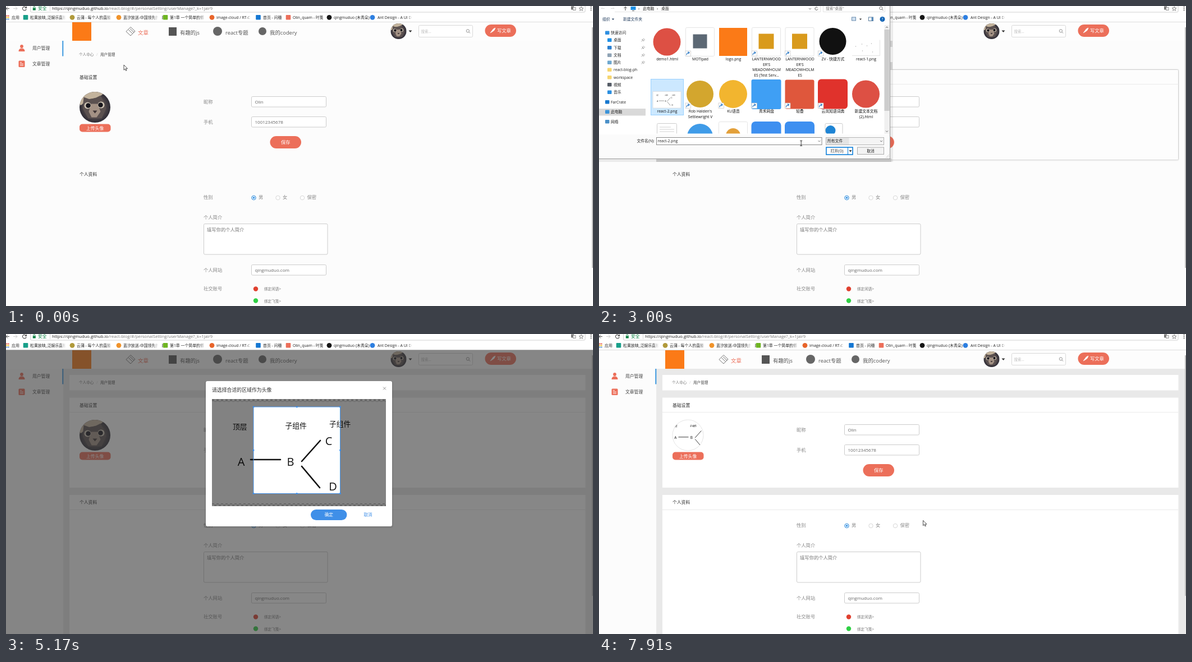
These frames come from a looping animation (1046x535 px, 8000 ms). An HTML page:

```html
<!DOCTYPE html>
<html lang="zh-CN">
<head>
<meta charset="utf-8">
<title>用户管理</title>
<style>
html, body { margin: 0; width: 100%; height: 100%; overflow: hidden; background: #fff; }
svg { display: block; width: 1046px; height: 535px; }
text { font-family: "Open Sans", "Noto Sans CJK SC", "Noto Sans CJK", sans-serif; white-space: pre; }
</style>
</head>
<body>
<svg id="stage" viewBox="0 0 1046 535" xmlns="http://www.w3.org/2000/svg"></svg>
<script>
const RED = '#ec6f5a', BLUE = '#3f8fe8', LOOP = 8000;

// Drawing helpers: each returns SVG markup
const text = (x, y, size, str, fill = '#444', more = '') =>
  `<text x="${x}" y="${y + size * 0.36}" font-size="${size}" fill="${fill}" ${more}>${str}</text>`;
const mid = (x, y, size, str, fill) => text(x, y, size, str, fill, 'text-anchor="middle"');
const rect = (x, y, w, h, fill, more = '') =>
  `<rect x="${x}" y="${y}" width="${w}" height="${h}" fill="${fill}" ${more}/>`;
const box = (x, y, w, h, stroke = '#ccc', fill = '#fff', r = 2) =>
  rect(x + .5, y + .5, w - 1, h - 1, fill, `stroke="${stroke}" rx="${r}"`);
const dot = (x, y, r, fill, more = '') => `<circle cx="${x}" cy="${y}" r="${r}" fill="${fill}" ${more}/>`;
const path = (d, stroke, w = 1, fill = 'none') =>
  `<path d="${d}" stroke="${stroke}" stroke-width="${w}" fill="${fill}"/>`;
const group = (id, body, more = '') => `<g id="${id}" ${more}>${body}</g>`;
const lens = (x, y, c) => dot(x - .6, y - .6, 2.6, 'none', `stroke="${c}" stroke-width=".8"`) +
  path(`M${x + 1.3} ${y + 1.3}l2.2 2.2`, c, .9);
const chevron = (x, y, c = '#555') => path(`M${x - 2} ${y - 1}l2 2l2-2`, c, .8);
const caret = (x, y, c = '#333', s = 2.2) => path(`M${x - s} ${y - s / 2}h${2 * s}l${-s} ${s * 1.2}z`, 'none', 0, c);

const defs = `<defs>
  <clipPath id="round"><circle r="27.5"/></clipPath>
  <clipPath id="files"><rect x="84" y="33" width="425" height="194.5"/></clipPath>
  <clipPath id="frame"><rect x="367" y="116" width="310" height="191"/></clipPath>
  <linearGradient id="fade"><stop offset="0" stop-color="#fff" stop-opacity="0"/><stop offset="1" stop-color="#fff"/></linearGradient>
  <radialGradient id="fur"><stop offset="0" stop-color="#8b7a70"/><stop offset=".55" stop-color="#5a504f"/><stop offset="1" stop-color="#2d2b35"/></radialGradient>
  <pattern id="check" x="367" y="116" width="8" height="8" patternUnits="userSpaceOnUse">
    ${rect(0, 0, 8, 8, '#fff') + rect(0, 0, 4, 4, '#ccc') + rect(4, 4, 4, 4, '#ccc')}</pattern>
  ${group('cat', rect(-28, -28, 56, 56, 'url(#fur)') +
    path('M-28-28H20L6-17L-14-14L-24-4H-28z', 'none', 0, '#c3b39c') +
    path('M-20-18L-9-14L2-17L10-21L15-11L20 2L12 20H-12L-22 2z', 'none', 0, '#5b5150') +
    path('M-7-6L5-6L10 8L3 18H-6L-11 8z', 'none', 0, '#a39184') +
    dot(-13, -3, 6, '#cfc4b4') + dot(-12, -3, 4.3, '#17151b') + dot(11, -4, 6, '#cfc4b4') + dot(10, -4, 4.3, '#17151b') +
    path('M-4 6H4L0 11z', 'none', 0, '#3c3233'), 'clip-path="url(#round)"')}
  ${group('diagram', text(404, 165, 12.8, '顶层', '#111') + text(497.5, 163, 12.8, '子组件', '#111') +
    text(576, 160, 12.8, '子组件', '#111') +
    [['A', 419, 228], ['B', 507, 228], ['C', 575, 191], ['D', 582.5, 272]].map(([s, x, y]) => mid(x, y, 20, s, '#111')).join('') +
    path('M436 224H489M527 227L560 190M527 236L559 274', '#111', 2.6), 'stroke-linecap="round"')}
</defs>`;

function browserBar() {
  const marks = [
    [35, '#19a08a', 43, '松果放映_泛娱乐直播', 106], [118, '#b09a3c', 126, '云蒲 - 每个人的直播平', 188, 1],
    [201, '#f0932b', 209, '蓝汐放送-中国领先的游', 271, 1], [284, '#6fb522', 292, '第1章 一个简单的博客', 354],
    [367, '#e8642a', 375, 'image-cloud / RT-C', 437, 1], [449.5, '#1577d2', 458, '首页 - 问穗', 0],
    [503, RED, 511, 'Olin_quam - 叶笺', 0], [576, '#161616', 584, 'qingmuduo (木青朵)', 0, 1],
    [653, '#2e7fe0', 662, 'Ant Design - A UI D', 724, 1]];
  let s = rect(0, 0, 1046, 28.5, '#fff') + rect(0, 28, 1046, 1, '#dcdcdc');
  s += path('M6 4.5H0M3 1.5L0 4.5L3 7.5', '#555') + path('M13 4.5H20M17 1.5L20 4.5L17 7.5', '#ccc');
  s += path('M35.6 2.5A3.4 3.4 0 1 0 36.2 5.5M36.4 .8V3.4H33.6', '#444', 1.1);
  s += path('M43.5 0V9Q43.5 11 45.5 11H1030Q1032 11 1032 9V0', '#d0d0d0');
  s += rect(47.8, 3.6, 5, 4, '#0b8043') + path('M48.8 4V2.4a1.5 1.5 0 0 1 3 0V4', '#0b8043', .9);
  s += text(57, 4.5, 7.8, '安全', '#0b8043') + rect(78, 0, .8, 9, '#ccc');
  s += text(82, 4.5, 7.6, 'https://qingmuduo.github.io<tspan fill="#777">/react-blog/#/personalSetting/userManage?_k=1jair9</tspan>', '#222');
  s += rect(1007, .5, 5, 6, '#777') + box(1010, 2, 5.5, 6, '#999', '#eee', 0);
  s += path('M1025 1l1.1 2.5l2.7.2l-2.1 1.8l.7 2.7l-2.4-1.5l-2.4 1.5l.7-2.7l-2.1-1.8l2.7-.2z', '#555', .7);
  s += [1.5, 4.5, 7.5].map(y => dot(1042.5, y, .9, '#555')).join('');
  for (let i = 0; i < 6; i++) s += rect(i % 2 * 3 + .5, 16.5 + (i >> 1) * 3, 2, 2, ['#e5483b', '#f4b400', '#4285d4'][i >> 1]);
  s += text(10, 20.5, 7, '应用', '#333');
  for (const [ix, c, x, label, end, circle] of marks) {
    s += circle ? dot(ix, 20.3, 4.4, c) : rect(ix - 4.3, 16, 8.6, 8.6, c, 'rx="1"');
    s += text(x, 20.5, 6.9, label, '#222');
    if (end) s += rect(end - 9, 15, 9, 12, 'url(#fade)') + rect(end, 15, 7, 12, '#fff');
  }
  return s;
}

function header() {
  return rect(0, 29, 1046, 33, '#fdfdfd') + rect(118, 29, 34, 33, '#fb7a17') +
    path('M222 37.5L230 45L222 53L214 45.500z M218.500 42.500L225.500 49.300M221 40.500L228 47', '#666', .9) +
    text(235, 48, 9.4, '文章', RED) + rect(290, 38, 14, 15, '#555') + text(310, 48, 9.4, '有趣的js', '#555') +
    dot(377, 45, 8, '#666') + text(391, 48, 9.4, 'react专题', '#555') +
    dot(457, 45, 7, '#666') + text(470, 48, 9.4, '我的codery', '#555') +
    '<use href="#cat" transform="translate(699.5 45) scale(.51)"/>' + caret(720.5, 45, '#333', 3) +
    box(735, 34, 97, 22, '#d9d9d9') + text(739.5, 45.5, 6.5, '搜索...', '#bbb') + lens(823.5, 45, '#777') +
    rect(853.5, 33, 55.5, 22, RED, 'rx="11"') + path('M863 48L866 44Q868 40 872 39Q871 44 866.500 46z', '#fff', .7, '#fff') +
    text(875, 44, 8.3, '写文章', '#fff');
}

function sidebar() {
  return dot(28, 72, 2.9, RED) + path('M22.500 81Q22.500 75.500 28 75.500T33.500 81z', 'none', 0, RED) + text(47, 75.5, 7.8, '用户管理') +
    rect(100.4, 62, 1.8, 27.5, '#2a8fdc') + rect(22.5, 97.5, 11, 11.5, RED, 'rx="1.5"') +
    path('M25 100.700h3M25 103.300h6M25 106h6', '#fff', 1) + text(47, 103, 7.8, '文章管理');
}

function content() {
  const label = (y, s) => text(352, y, 8.3, s, '#888');
  const field = (y, s) => box(437, y, 134, 19.5) + text(443.5, y + 9.8, 8, s, '#666');
  const radio = (x, s) => dot(x, 342, 3.7, '#fff', 'stroke="#ccc" stroke-width=".8"') + text(x + 8.5, 341, 8.3, s, '#888');
  return text(130, 87, 6.6, '个人中心', '#777') + text(161, 87, 6.6, '/', '#ccc') + text(168, 87, 6.6, '用户管理', '#444') +
    text(131, 127, 7.8, '基础设置', '#333') +
    '<use id="oldPic" href="#cat" transform="translate(158.5 180.5)"/>' +
    group('newPic', dot(0, 0, 27.5, '#fff', 'stroke="#ddd" stroke-width=".8"') +
      '<g clip-path="url(#round)"><use href="#diagram" transform="translate(-27.5 -27.5) scale(.3245) translate(-402.5 -129)"/></g>',
      'transform="translate(158.5 180.5)"') +
    rect(131, 210.5, 55.5, 14, RED, 'rx="5"') + text(143, 217.8, 7.8, '上传头像', '#fff') +
    label(171, '昵称') + field(161, 'Olin') + label(207, '手机') + field(197, '10012345678') +
    rect(470.5, 232, 55.5, 22, RED, 'rx="11"') + text(490, 243, 8.3, '保存', '#fff') +
    text(131, 300.5, 7.8, '个人资料', '#333') + label(341, '性别') +
    radio(441.5, '男') + dot(441.5, 342, 3.7, 'none', `stroke="#2a8fe6"`) + dot(441.5, 342, 1.8, '#2a8fe6') +
    radio(484.5, '女') + radio(528, '保密') +
    label(377, '个人简介') + box(352, 388, 221.5, 55.5) + text(358, 399.5, 8.3, '填写你的个人简介', '#777') +
    label(471, '个人网站') + field(461, 'qingmuduo.com') + label(504, '社交账号') +
    dot(445, 504.5, 4.2, '#e0402f') + text(460, 505, 6.6, '绑定闲语&gt;', '#777') +
    dot(445, 525.5, 4.2, '#2fd044') + text(460, 526.5, 6.6, '绑定飞笺&gt;', '#777');
}

function page() {
  const panel = (y, h) => rect(113, y, 919.5, h, '#fff');
  const rule = y => rect(113, y, 919.5, 1, '#ebebeb');
  return rect(0, 29, 1046, 506, '#fcfcfc') +
    group('gaps', rect(102, 62, 944, 473, '#e9e9e9') + panel(73, 27.5) + panel(113.5, 160.5) + panel(287, 248) + rule(139) + rule(313)) +
    group('hover', box(111, 112, 923, 164.5, '#eee', 'none', 3) + box(112, 113, 921, 162, '#d2d2d2', '#fdfdfd', 2) + rule(139) +
      rect(519, 62, 4, 11, '#ddd') + rect(519, 100, 4, 13, '#ddd')) +
    header() + sidebar() + content() + rect(1044, 38, 2, 429, '#bdbdbd');
}

function fileList() {
  const cols = [121, 180, 239, 298, 357.5, 416.5, 475.5];
  const sheet = (x, y) => box(x - 26, y - 26, 52, 52, '#e4e4e4');
  const sq = (x, y, s, c, r = 0) => rect(x - s / 2, y - s / 2, s, s, c, `rx="${r}"`);
  const link = (x, y) => rect(x - 26, y + 16, 9.5, 9.500, '#fff', 'stroke="#bbb" stroke-width=".6"') +
    path(`M${x - 24} ${y + 23.500}q0-4 5-4.500m-2.600-1.600l2.600 1.600l-1.800 2.500`, '#1c6fc0', 1.100);
  const rows = [
    [64, [[x => dot(x, 64, 24.5, '#dd5044'), 'demo1.html'],
      [x => sheet(x, 64) + sq(x, 63, 25, '#5c6874') + link(x, 64), 'MOTIpad'],
      [x => sq(x, 64, 50, '#fb7a17'), 'logo.png'],
      [x => sheet(x, 64) + sq(x, 63, 27, '#d99a1c') + link(x, 64), 'LANTERNWOOD', 'ER&#39;S', 'MEADOWHOLM', 'ES (Test Serv...'],
      [x => sheet(x, 64) + sq(x, 63, 27, '#d99a1c') + link(x, 64), 'LANTERNWOOD', 'ER&#39;S', 'MEADOWHOLM', 'ES'],
      [x => dot(x, 63, 24, '#111') + link(x, 64), 'ZV - 快捷方式'],
      [x => rect(x - 24.5, 61, 49, 27.500, '#fff') + path(`M${x - 24.500} 88.500h49.500v-28`, '#ddd', .8) +
        [[-18, 72], [-7, 68], [-6, 80], [2, 71], [10, 67], [12, 82]].map(p => dot(x + p[0], p[1], .7, '#aaa')).join(''), 'react-1.png']]],
    [157, [[x => rect(x - 25, 152.500, 50, 29.500, '#fff', 'stroke="#ddd" stroke-width=".8"') +
        `<use href="#diagram" transform="translate(${x - 25} 152.5) scale(.161) translate(-367 -121)"/>`, 'react-2.png'],
      [x => dot(x, 157, 24, '#d3a62e') + link(x, 157), 'Rob Halden&#39;s', 'Settlewright V'],
      [x => dot(x, 157, 25, '#f2b52f') + link(x, 157), 'KU语音'],
      [x => sq(x, 157.5, 53, '#3f9ff4', 3) + link(x, 157), '青禾网盘'],
      [x => sq(x, 157.5, 52, '#df573c', 3) + link(x, 157), '轻叠'],
      [x => sq(x, 157, 53, '#e0322c', 6) + link(x, 157), '云岚知语词典'],
      [x => dot(x, 157, 24.5, '#dd5044'), '新建文本文档', '(2).html']]],
    [232, [[x => box(x - 18, 209, 36, 44, '#ccc') + path(`M${x - 13} 216h20m-20 4h26m-26 4h26`, '#ccc', .9)],
      [x => dot(x, 233, 23, '#3f9be8')], [x => sheet(x, 232) + dot(x, 231, 13, '#e3a03a')],
      [x => sq(x, 232.5, 53, '#3d8ff0', 7)], [x => sq(x, 232.5, 53, '#3d8ff0', 7)],
      [x => box(x - 14, 209, 32, 44, '#ccc') + dot(x - 4, 222, 9, '#1e84d4')]]]];
  let s = group('tile', rect(92.5, 130.5, 58, 64, '#cce8ff', 'stroke="#99d1ff"'));
  for (const [cy, items] of rows) items.forEach(([icon, ...lines], i) => {
    s += icon(cols[i]);
    lines.forEach((l, n) => s += mid(cols[i] + .5, cy + 31 + n * 9.5, 6.8, l, '#111'));
  });
  return `<g clip-path="url(#files)">${s}</g>`;
}

function dialog() {
  const side = [['快速访问', 48, '#2f8fe0', 1], ['桌面', 61, '#1e90e6'], ['下载', 74.5, '#2b7fd0'], ['文档', 88, '#8fa3b5'], ['图片', 101, '#6fa8cf'],
    ['react-blog-ph', 114, '#f6d570'], ['workspace', 127.5, '#f6d570'], ['视频', 140.5, '#555c66'], ['音乐', 154, '#2b8fe0'],
    ['FarCrate', 171.5, '#1979cf', 1], ['此电脑', 189, '#3a93d8', 1], ['网络', 206.5, '#4a90c8', 1]];
  const g = '#222';
  let s = rect(0, 0, 524, 278, '#000', 'opacity=".07"') + rect(102, 272, 419, 6, '#c4c4c4') +
    rect(-20, -20, 538.5, 292.5, '#fff', 'stroke="#9a9a9a"') + rect(0, 229, 518, 43, '#fbfbfb');
  s += path('M10 4.500H4l2-2M21 4.500h6l-2-2', '#ccc', .8) + path('M47 8V1.500M44.500 4L47 1.500L49.500 4', '#444', 1);
  s += rect(56.500, 1, 9, 6, '#1e90e6') + rect(59, 8, 4, 1, '#666');
  s += text(70, 4.5, 6.8, '›', g) + text(78, 4.5, 6.8, '此电脑', g) + text(103, 4.5, 6.8, '›', g) + text(111, 4.5, 6.8, '桌面', g);
  s += chevron(376, 5) + path('M389.500 3A2.600 2.600 0 1 0 390 5.500', '#444', .9) + path('M28 10.500H394.500V0M399.500 0V10.500H509.500V0', '#ddd', .8);
  s += text(404, 4.5, 6.8, '搜索"桌面"', '#777') + lens(503, 4.500, '#555');
  s += text(6, 23.5, 6.8, '组织', '#1e395b') + caret(25, 23.5, '#1e395b') + text(43, 23.5, 6.8, '新建文件夹', '#1e395b');
  s += box(450, 19.500, 8, 7, '#6a8cad', '#cfe0f0', 0) + caret(466, 23.5) + box(480, 19.500, 9, 7.500, '#5b7d9c', '#fff', 0) + rect(485.500, 20, 3, 6, '#5b8fc0');
  s += dot(505, 23.500, 4.500, '#0f63b5') + mid(505, 23.5, 6.5, '?', '#fff');
  s += rect(0, 183, 83, 12.5, '#d9d9d9');
  side.forEach(([label, y, c, top], i) => {
    const x = top ? 11 : 15;
    s += rect(x, y - 3.500, 7.500, 6.500, c, 'rx="1"') + text(top ? 21 : 26, y, 6.8, label, g);
    if (i > 0 && i < 5) s += path(`M75.500 ${y + 2.500}l2-2m-1-2.500l3.500 3.500m-.500-4.500l2 2l-2.500 2.500l-2-2z`, '#888', .7);
  });
  s += fileList() + rect(508.5, 34, 9, 194, '#f0f0f0') + rect(508.5, 42, 9, 145, '#cdcdcd') +
    path('M511 39l2-2l2 2M511 222.500l2 2l2-2', '#555', .9);
  s += text(67.5, 241, 6.8, '文件名(N):', g) + box(102, 234, 295.5, 14, '#8a8a8a', '#fff', 0) +
    group('focus', box(102, 234, 295.5, 14, '#0078d7', '#fff', 0) + rect(105, 236.5, .8, 9, '#000')) + chevron(392.5, 241) +
    group('fileName', text(104.5, 241, 6.8, 'react-2.png', g));
  s += box(404, 234, 104, 14, '#b5b5b5', '#f4f4f4', 0) + rect(405, 235, 40.500, 12, '#e4e4e4') + text(407, 241, 6.8, '所有文件', g) + chevron(503, 241);
  s += rect(405, 252, 47, 13, '#fff', 'stroke="#0078d7" stroke-width="1.500"') + rect(443, 252, 1, 13, '#0078d7') + mid(424, 258.5, 6.8, '打开(O)', g) + caret(448, 258.5, '#222', 2.6);
  s += box(460, 251.5, 48, 13.5, '#adadad', '#f3f3f3', 0) + mid(484, 258.5, 6.8, '取消', g);
  return s + path('M517 268l-3 3M517 265l-6 6', '#bbb', .7);
}

function modal() {
  return rect(354, 84, 336, 262, '#000', 'opacity=".08" rx="4"') + rect(356, 84, 332, 259, '#fff', 'rx="3"') +
    text(367, 99.5, 8.9, '请选择合适的区域作为头像', '#333') + path('M672 94.500l5 5m0-5l-5 5', '#888', .9) +
    `<g clip-path="url(#frame)">${rect(367, 116, 310, 191, 'url(#check)') + rect(367, 121, 310, 181, '#fff')}
      <use href="#diagram"/><path id="shade" fill="#000" fill-opacity=".49" fill-rule="evenodd"/></g>
    <path id="cropLine" fill="none" stroke="#4393ee"/><path id="grips" fill="#3a8ff0"/>` +
    rect(543, 313, 64.500, 19, BLUE, 'rx="9.500" id="okFill"') + mid(575.3, 322.5, 7.6, '确定', '#fff') + mid(645, 322.5, 7.6, '取消', BLUE);
}

const pointers = {
  arrow: path('M0 0V9.200L2.100 7.200L3.600 10.400L5 9.800L3.600 6.700H6.500z', '#222', .8, '#fff'),
  beam: path('M-2-4.500H2M0-4.500V4.500M-2 4.500H2', '#222', .9),
  cross: path('M-6.500 0H6.500M0-6.500V6.500', '#333', 1),
  move: path('M-5.500 0H5.500M0-5.500V5.500M-1.500-4L0-5.500L1.500-4M-1.500 4L0 5.500L1.500 4M-4-1.500L-5.500 0L-4 1.500M4-1.500L5.500 0L4 1.500', '#222', .9)
};

const stage = document.getElementById('stage');
stage.innerHTML = defs + browserBar() + page() +
  rect(0, 28.5, 1046, 506.5, '#373737', 'id="mask"') +
  group('dialog', dialog()) + group('modal', modal()) +
  group('pointer', Object.entries(pointers).map(([k, v]) => group(k, v)).join(''));
const el = id => document.getElementById(id);
const show = (id, on) => el(id).style.display = on ? '' : 'none';

// Screen refreshes: start, end, number of steps
const spans = [[0, 0, 1], [120, 1100, 8], [1220, 2250, 9], [2370, 3360, 9], [3510, 4500, 8], [4620, 4620, 1],
  [5020, 6030, 8], [6180, 7150, 8], [7280, 7280, 1], [7670, 7910, 3]];
function snap(t) {
  const [a, b, n] = spans.filter(s => s[0] <= t).pop();
  if (n < 2) return a;
  const gap = (b - a) / (n - 1);
  return a + gap * Math.min(n - 1, Math.floor((t - a) / gap + .1));
}
function at(track, t) {
  const i = track.findIndex(k => k[0] > t);
  if (i < 0) return track[track.length - 1].slice(1);
  if (!i) return track[0].slice(1);
  const a = track[i - 1], b = track[i], p = (t - a[0]) / (b[0] - a[0]);
  return a.slice(1).map((v, j) => v + (b[j + 1] - v) * p);
}

const mouse = [[0, 210, 105], [120, 207, 112], [820, 165, 216], [1100, 165, 216], [1340, 399, 227], [1600, 380, 222], [2250, 140, 172],
  [2400, 124, 164], [2620, 124, 164], [2990, 361, 245], [3300, 440, 257], [3510, 440, 257], [3650, 434, 267], [4200, 446, 150], [4500, 450, 138],
  [5170, 500, 200], [5500, 435, 187], [5740, 435, 187], [6030, 462, 186], [6180, 557, 270], [6470, 572, 285],
  [6610, 500, 200], [6760, 500, 213], [6900, 598, 300], [7150, 578, 326], [7280, 580, 326], [7670, 580, 326], [7910, 577.5, 332.5]];
const shapes = [[0, 'arrow'], [2850, 'beam'], [3200, 'arrow'], [3600, 'cross'], [4600, ''], [5250, 'move'], [6800, 'arrow']];
const crop = [[3510, 450, 140, 144], [3700, 450, 140, 144], [3790, 441, 130, 154.5], [5170, 441, 130, 154.5], [5500, 376, 117, 154],
  [5740, 376, 117, 154], [6030, 403, 116, 154], [6180, 403, 116, 154], [6470, 403, 116, 169.5], [6610, 403, 116, 169.5], [6760, 402.5, 129, 169.5]];
const dialogFade = [[1100, 0, .93], [1220, .6, .96], [1340, .98, .997], [1460, 1, 1], [3360, 1, 1], [3510, .6, .98], [3650, .15, .96], [3780, 0, .95]];
const modalFade = [[3510, 0, .4], [3650, .82, .79], [3780, 1, 1], [7670, 1, 1], [7790, .35, .7], [7910, 0, .4]];
const maskFade = [[3360, 0], [3510, .06], [3650, .27], [3790, .75], [3930, 1], [7670, 1], [7790, .45], [7910, 0]];

function zoom(id, track, t, x, y) {
  const [alpha, k] = at(track, t);
  show(id, alpha > 0);
  el(id).setAttribute('opacity', alpha);
  el(id).setAttribute('transform', `translate(${x} ${y}) scale(${k}) translate(${-x} ${-y})`);
}

function draw(now) {
  const t = snap(now);
  show('gaps', t >= 3510);
  show('hover', t >= 200 && t < 3510);
  show('oldPic', t < 7670);
  show('newPic', t >= 7670);
  show('tile', t >= 2370);
  show('focus', t < 2480);
  show('fileName', t >= 2480);
  el('tile').setAttribute('opacity', t < 2480 ? .5 : 1);
  el('mask').setAttribute('opacity', .6 * at(maskFade, t)[0]);
  zoom('dialog', dialogFade, t, 252, 115);
  zoom('modal', modalFade, t, 522, 222);

  const [x, y, s] = at(crop, t), sq = `M${x} ${y}h${s}v${s}h${-s}z`;
  el('shade').setAttribute('d', 'M367 116h310v191h-310z' + sq);
  el('cropLine').setAttribute('d', sq);
  let grips = '';
  for (let i = 0; i < 9; i++) if (i !== 4) grips += `M${x + s * (i % 3) / 2 - 1.3} ${y + s * Math.floor(i / 3) / 2 - 1.3}h2.6v2.6h-2.6z`;
  el('grips').setAttribute('d', grips);
  el('okFill').setAttribute('fill', t >= 7100 ? '#8fbff4' : BLUE);

  const [mx, my] = at(mouse, t), kind = shapes.filter(k => k[0] <= t).pop()[1];
  el('pointer').setAttribute('transform', `translate(${mx} ${my})`);
  for (const k in pointers) show(k, k === kind);
}

const start = performance.now();
(function tick() {
  draw((performance.now() - start) % LOOP);
  requestAnimationFrame(tick);
})();
</script>
</body>
</html>
```
